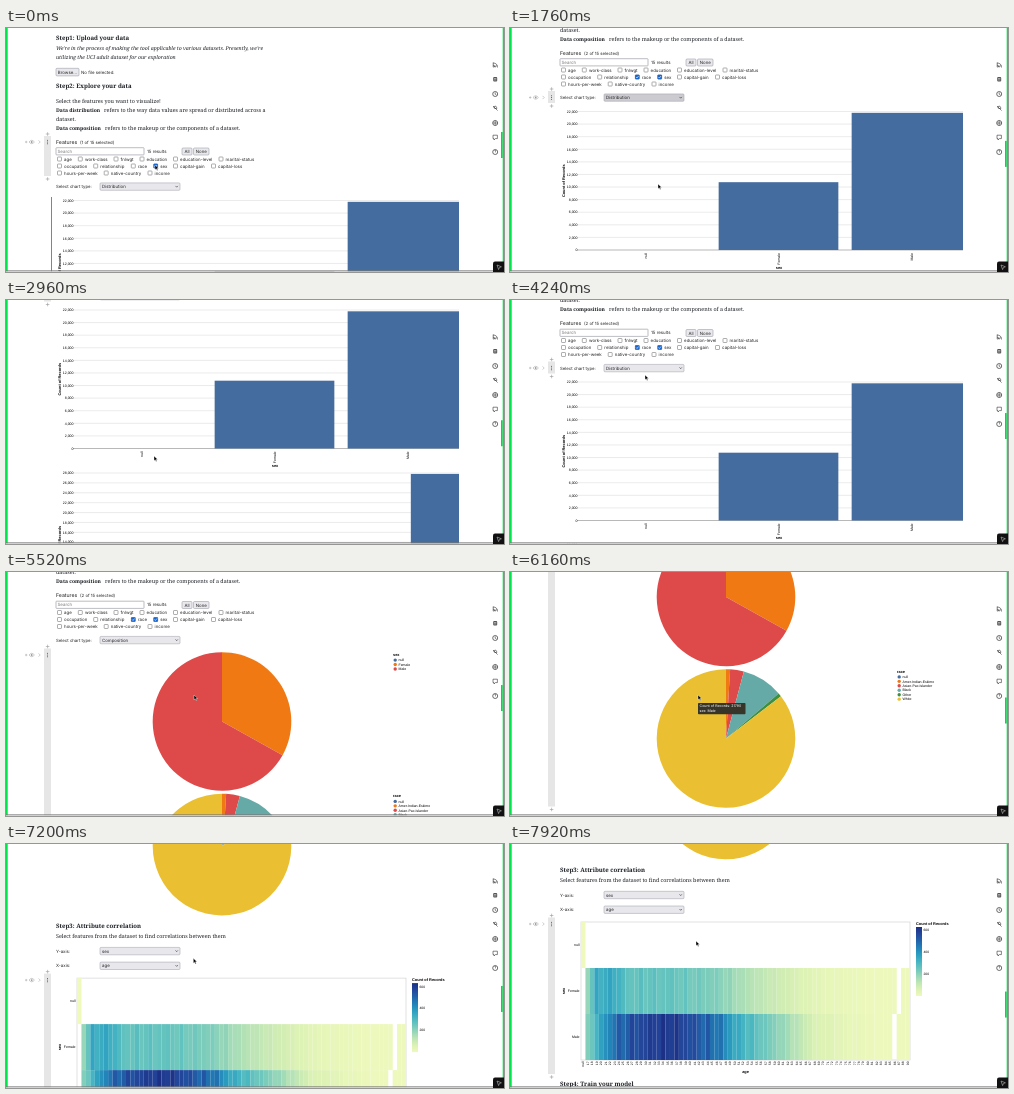
An HTML page that plays this animation: 498x244 px, repeating every 8 s.

```html
<!DOCTYPE html>
<html lang="en">
<head>
<meta charset="utf-8">
<title>Notebook walkthrough</title>
<style>
html, body { margin: 0; width: 100%; height: 100%; overflow: hidden; background: #fff; }
svg { display: block; text-rendering: geometricPrecision; }
text { font: 4.4px Inter, sans-serif; fill: #222; white-space: pre; }
.serif { font: 5.4px "Noto Serif", serif; fill: #1b1e23; }
.chart { font: 3.5px "Liberation Sans", Arial, sans-serif; fill: #000; }
.bold { font-weight: 700; }
.italic { font-style: italic; }
</style>
</head>
<body>
<svg id="stage" width="498" height="244" viewBox="0 0 498 244"></svg>
<script>
const LOOP = 8000, STEP = 80;
const PALETTE = ['#446c9e', '#f07914', '#de4a49', '#66aaa8', '#3f8f40', '#eac032'];
const SEX = { title: 'sex', names: ['null', 'Female', 'Male'], counts: [0, 10771, 21790] };
const RACE = {
  title: 'race',
  names: ['null', 'Amer-Indian-Eskimo', 'Asian-Pac-Islander', 'Black', 'Other', 'White'],
  counts: [0, 311, 1039, 3124, 271, 27816]
};
const range = (n, f) => Array.from({ length: n }, (_, i) => f(i)).join('');

// Text is placed by the middle of its line.
function text(x, y, str, { size = 4.4, cls = '', anchor = 'start', turn = 0, fill = '', id = '' } = {}) {
  const style = `font-size:${size}px${fill && ';fill:' + fill}`;
  return `<text id="${id}" class="${cls}" style="${style}" text-anchor="${anchor}" ` +
    `transform="translate(${x} ${y}) rotate(${turn})" y="${size * 0.35}">${str}</text>`;
}
const rect = (x, y, w, h, fill, more = '') =>
  `<rect x="${x}" y="${y}" width="${w}" height="${h}" fill="${fill}" ${more}/>`;
const path = (d, more = '') => `<path d="${d}" fill="none" stroke="#333" stroke-width=".6" ${more}/>`;
const group = (id, body) => `<g id="${id}">${body}</g>`;
const serif = (x, y, str, cls = '', size = 5.4) => text(x, y, str, { size, cls: 'serif ' + cls });
const heading = (y, str) => serif(50, y, str, 'bold', 6.05);
const label = (x, y, str, more) => text(x, y, str, { size: 3.5, cls: 'chart', ...more });
const title = (x, y, str, more) => label(x, y, str, { size: 3.9, cls: 'chart bold', ...more });

function button(x, y, w, h, str) {
  return rect(x, y, w, h, '#e9e9ed', 'stroke="#8f8f9d" stroke-width=".5" rx="1"') +
    text(x + w / 2, y + h / 2, str, { anchor: 'middle' });
}
function dropdown(y, str, id) {
  return rect(94, y - 3.7, 80, 7.4, '#e7e7ec', `id="${id}-box" stroke="#9a9aa6" stroke-width=".5" rx="1"`) +
    text(96, y, str, { id }) + path(`M169.5 ${y - 0.7}l1.2 1.3 1.2 -1.3`);
}
function checkbox(x, y, name) {
  return rect(x - 2, y - 2, 4, 4, '#fff', 'stroke="#777" stroke-width=".6" rx=".6"') +
    group('check-' + name, rect(x - 2.2, y - 2.2, 4.4, 4.4, '#1a66cf', 'rx=".7"') +
      path(`M${x - 1.2} ${y}l.9 1 1.6 -2`, 'style="stroke:#fff"')) +
    text(x + 4.6, y, name);
}

const OPTIONS = [
  [131, [[53.5, 'age'], [74.3, 'work-class'], [110, 'fnlwgt'], [136, 'education'], [169.5, 'education-level'], [215, 'marital-status']]],
  [138, [[53.5, 'occupation'], [89.7, 'relationship'], [127.3, 'race'], [149.7, 'sex'], [169.5, 'capital-gain'], [207.5, 'capital-loss']]],
  [145, [[53.5, 'hours-per-week'], [100.2, 'native-country'], [144, 'income']]]
];

function intro() {
  return heading(10, 'Step1: Upload your data') +
    serif(50, 19.8, "We're in the process of making the tool applicable to various datasets. Presently, we're", 'italic', 5.2) +
    serif(50, 28.8, 'utilizing the UCI adult dataset for our exploration', 'italic', 5.2) +
    button(50, 40.3, 23, 7.6, 'Browse…') + text(75, 44.2, 'No file selected.') +
    heading(57.7, 'Step2: Explore your data') +
    serif(50, 73, 'Select the features you want to visualize!') +
    serif(50, 82, 'Data distribution', 'bold', 5.05) +
    serif(98, 82, 'refers to the way data values are spread or distributed across a') +
    serif(50, 91, 'dataset.') +
    serif(50, 99.8, 'Data composition', 'bold', 5.05) +
    serif(99, 99.8, 'refers to the makeup or the components of a dataset.') +
    text(50, 114, 'Features', { size: 5.2 }) + text(74, 114.2, '', { size: 4.3, id: 'picked' }) +
    rect(50, 119.7, 88, 7.2, '#fff', 'stroke="#8f8f9d" stroke-width=".6" rx=".6"') +
    text(51.5, 123.4, 'Search', { fill: '#777' }) + text(141, 123.4, '15 results') +
    button(176, 120, 10, 7, 'All') + button(187.5, 120, 15.5, 7, 'None') +
    OPTIONS.map(([y, row]) => row.map(([x, name]) => checkbox(x, y, name)).join('')).join('') +
    text(50, 158.6, 'Select chart type:', { size: 4.3 }) + dropdown(158.6, 'Distribution', 'kind');
}

function barChart(top, max, { title: name, names, counts }) {
  const left = 69, right = 453, height = 138.5, base = top + height, step = 399 / names.length;
  const grid = range(max / 2 + 1, i => {
    const y = base - height * 2 * i / max;
    return path(`M${left - 2} ${y}H${right}`, `style="stroke:${i ? '#ddd' : '#888'}"`) +
      label(left - 1.5, y, (i * 2000).toLocaleString('en-US'), { anchor: 'end' });
  });
  const bars = range(names.length, i => {
    const x = left + step * (i + 0.05), h = height * counts[i] / max / 1000;
    return rect(x, base - h, Math.min(step * 0.9, right - x), h, PALETTE[0]) +
      label(left + step * (i + 0.5), base + 3, names[i], { anchor: 'end', turn: -90 });
  });
  const nameY = base + Math.max(...names.map(s => s.length)) * 1.75 + 7;
  return grid + bars + title(54, (top + base) / 2, 'Count of Records', { anchor: 'middle', turn: -90 }) +
    title(269, nameY, name, { anchor: 'middle' });
}

function pieChart(cy, legendY, { title: name, names, counts }) {
  const cx = 216, r = 69.3, total = counts.reduce((a, b) => a + b);
  const rim = a => `${cx + r * Math.sin(a)} ${cy - r * Math.cos(a)}`;
  let end = 0;
  return title(387, legendY, name) + range(names.length, i => {
    const start = end, y = legendY + 5.6 + 4.45 * i;
    end += counts[i] / total * 2 * Math.PI;
    return `<path fill="${PALETTE[i]}" d="M${cx} ${cy}L${rim(start)}A${r} ${r} 0 ${+(end - start > Math.PI)} 1 ${rim(end)}Z"/>` +
      `<circle cx="389.2" cy="${y}" r="1.7" fill="${PALETTE[i]}"/>` + label(392.5, y, names[i]);
  });
}

// Value of a piecewise linear track [[key, value], ...].
function track(points, key) {
  const i = points.findIndex(p => p[0] > key);
  if (i < 0) return points[points.length - 1][1];
  if (!i) return points[0][1];
  const [k0, v0] = points[i - 1], [k1, v1] = points[i];
  return v0 + (v1 - v0) * (key - k0) / (k1 - k0);
}

const RAMP = ['#eff9bd', '#dbf1b4', '#bde5b5', '#94d5b9', '#69c5be', '#45b4c2', '#2c9ec0', '#2182b8', '#2163aa', '#23479c', '#1c3185'];
function rampColor(share) {
  const p = Math.max(0, Math.min(share, 0.999)) * (RAMP.length - 1), i = Math.floor(p);
  const channel = k => {
    const [a, b] = [RAMP[i], RAMP[i + 1]].map(c => parseInt(c.slice(k, k + 2), 16));
    return Math.round(a + (b - a) * (p - i));
  };
  return `rgb(${channel(1)},${channel(3)},${channel(5)})`;
}
const FEMALE = [[17, 186], [19, 340], [23, 345], [26, 265], [36, 260], [46, 215], [52, 150], [60, 90], [70, 30], [80, 8]];
const MALE = [[17, 206], [20, 365], [23, 480], [28, 560], [35, 620], [39, 570], [47, 460], [50, 350], [55, 270], [62, 165], [68, 65], [76, 25], [84, 5]];

function heatmap() {
  const left = 71, top = 513.5, row = 46, cols = 74, col = 329 / cols, max = 630;
  const cell = (i, r, n) => rect(left + col * i, top + row * r, col + 0.05, row, rampColor(n / max));
  const jitter = i => 1 + 0.07 * Math.sin(i * 12.9) * Math.cos(i * 4.1);
  const body = range(cols - 1, k => {
    const i = k + 1, age = 17 + k;
    return (age === 87 ? '' : cell(i, 1, track(FEMALE, age) * jitter(i))) +
      (age === 86 ? '' : cell(i, 2, track(MALE, age) * jitter(i + 5)));
  });
  const ages = range(cols, i => label(left + col * (i + 0.5), top + 139.5, i === 0 ? 'null' : i === 73 ? 90 : 16 + i,
    { size: 3.3, anchor: 'end', turn: -90 }));
  return rect(left, top, 329, 138, '#fff', 'stroke="#ccc" stroke-width=".6"') + cell(0, 0, 0) + body + ages +
    SEX.names.map((n, r) => label(69.5, top + row * (r + 0.5), n, { anchor: 'end' })).join('') +
    title(54, top + 69, 'sex', { anchor: 'middle', turn: -90 }) + title(235.5, top + 149.5, 'age', { anchor: 'middle' }) +
    title(406, top + 1.5, 'Count of Records') + rect(406, top + 5, 6, 69, 'url(#ramp)') +
    [200, 400, 600].map(n => label(413.5, top + 74 - 69 * n / max, n, { size: 3.3 })).join('');
}

const after = () => heading(461.5, 'Step3: Attribute correlation') +
  serif(50, 471.7, 'Select features from the dataset to find correlations between them') +
  text(50, 486.5, 'Y-axis:') + dropdown(486.5, 'sex', 'y-axis') +
  text(50, 501.2, 'X-axis:') + dropdown(501.2, 'age', 'x-axis') +
  heatmap() + heading(675.5, 'Step4: Train your model');

// Side bar of the cell under the pointer: top, bottom, row of its controls.
const CELLS = { features: [108, 148, 114], select: [152, 164, 158.5], bars: [167, 522, 173.5], pies: [167, 449.5, 173.5], heat: [509, 665.5, 515.5] };
function cellMarks([top, bottom, y]) {
  const plus = cy => path(`M39.8 ${cy}h3.6m-1.8 -1.8v3.6`, 'style="stroke:#999"');
  return rect(38, top, 7, bottom - top, '#e6e6e6') + plus(top - 2) + plus(bottom + 3) +
    path(`M19 ${y}h2.4m-1.2 -1.2v2.4M23 ${y}q2.7 -3.4 5.4 0q-2.7 3.4 -5.4 0M32.6 ${y - 1.6}l1.6 1.6 -1.6 1.6`, 'style="stroke:#aaa"') +
    `<circle cx="25.7" cy="${y}" r=".9" fill="#999"/>` +
    [-1.7, 0, 1.7].map(d => `<circle cx="41.5" cy="${y + d}" r=".5" fill="#444"/>`).join('');
}

function frame() {
  const ring = y => `<circle cx="489.2" cy="${y}" r="2.5" fill="none" stroke="#333" stroke-width=".7"/>`;
  return rect(0, 0, 1.7, 244, '#00e64a') + rect(496.7, 0, 1.3, 244, '#00e64a') +
    rect(495, 104, 1.7, 26, '#12cf50', 'id="thumb"') +
    rect(0, 242.4, 498, 0.8, '#777') + rect(0, 243.2, 498, 0.8, '#ccc') +
    path('M487 35q4.5 0 4.5 4.5M487 37.2q2.2 0 2.2 2.2M487.2 34.5v4.6l4 -1.5') +
    rect(487.2, 49, 4, 4.6, '#555', 'rx="1"') + path('M488 50.5h2.4m-2.4 1.4h2.4', 'style="stroke:#ddd"') +
    ring(66) + path('M489.2 64.4v1.8l1.3 .8') +
    path('M487 78l4.6 4.6m-3.8 -3.8q2.8 -2 3 1.8q-3.4 .4 -3 -1.8') +
    ring(95) + path('M486.8 95h4.8m-2.4 -2.4v4.8') +
    path('M487 107.2h4.4v3.4h-2l-1.4 1.4v-1.4h-1z') +
    ring(124) + text(489.2, 124, '?', { size: 4, anchor: 'middle' }) +
    rect(487, 233.5, 13, 12, '#111', 'rx="2"') + path('M491 237l4.4 1.8 -2 .8 -.8 2z', 'style="stroke:#bbb"');
}

const stage = document.getElementById('stage');
stage.innerHTML =
  `<defs><linearGradient id="ramp" x1="0" y1="1" x2="0" y2="0">${
    RAMP.map((c, i) => `<stop offset="${i / 10}" stop-color="${c}"/>`).join('')}</linearGradient></defs>` +
  group('page',
    Object.entries(CELLS).map(([k, c]) => group('cell-' + k, cellMarks(c))).join('') + intro() +
    group('bars', barChart(172.5, 22, SEX) + group('second', barChart(335.5, 28, RACE))) +
    group('pies', pieChart(240, 173, SEX) + pieChart(381.5, 314.3, RACE) + after()) +
    rect(45.2, 169, 0.8, 350, '#666', 'id="running"')) +
  frame() +
  group('tooltip', rect(188, 131, 47.5, 11.3, '#37352a', 'rx=".8"') +
    text(189.5, 134, 'Count of Records: 21790', { size: 3.6, fill: '#fff' }) +
    text(189.5, 139, 'sex: Male', { size: 3.6, fill: '#fff' })) +
  group('pointer', '<path d="M0 0v4.8l1.2 -1 .8 1.8 .9 -.4 -.8 -1.7h1.6z" fill="#000" stroke="#fff" stroke-width=".4"/>');

const el = id => document.getElementById(id);
const show = (id, on) => { el(id).style.display = on ? '' : 'none'; };
const SCROLL = [[1040, 0], [1280, 28], [1760, 89], [1920, 97], [2000, 97], [2400, 235], [2560, 235], [2960, 162.5], [3200, 120], [3440, 90.5],
  [5760, 90.5], [6160, 215], [6240, 215], [6720, 294.5], [7120, 368], [7520, 425], [7600, 425], [7920, 435.5]];
const POINTER_X = [[0, 149], [240, 127], [480, 127], [960, 141], [1120, 148], [3520, 148], [4240, 135], [4560, 128], [5200, 122], [5520, 188], [7120, 188], [7360, 186]];
const POINTER_Y = [[0, 137], [480, 137], [960, 147], [1120, 156], [3520, 156], [4240, 75], [4560, 68], [4800, 68], [5200, 76], [5520, 123], [7120, 123], [7360, 97]];
const HOVER = [[0, 'features'], [1120, 'select'], [3520, 'bars'], [4240, 'select'], [5280, 'pies'], [7200, 'heat']];

document.querySelectorAll('[id^="check-"]').forEach(c => { c.style.display = 'none'; });
show('check-sex', true);

function draw(now) {
  const t = Math.floor(now % LOOP / STEP) * STEP;
  const scroll = track(SCROLL, t), both = t >= 400, pies = t >= 5280;
  const hover = HOVER.filter(h => h[0] <= t).pop()[1];
  el('page').setAttribute('transform', `translate(0 ${-scroll})`);
  el('pointer').setAttribute('transform', `translate(${track(POINTER_X, t)} ${track(POINTER_Y, t)})`);
  el('thumb').setAttribute('y', 104 + scroll * 0.1);
  for (const k in CELLS) show('cell-' + k, k === hover);
  show('check-race', both);
  show('second', both);
  show('bars', !pies);
  show('pies', pies);
  show('running', t < 400);
  show('tooltip', t >= 5840 && t < 7200);
  el('picked').textContent = `(${both ? 2 : 1} of 15 selected)`;
  el('kind').textContent = pies ? 'Composition' : 'Distribution';
  el('kind-box').setAttribute('fill', hover === 'select' && t < 2640 ? '#cbcbd0' : '#e7e7ec');
}
function tick() {
  draw(performance.now());
  requestAnimationFrame(tick);
}
tick();
</script>
</body>
</html>
```
